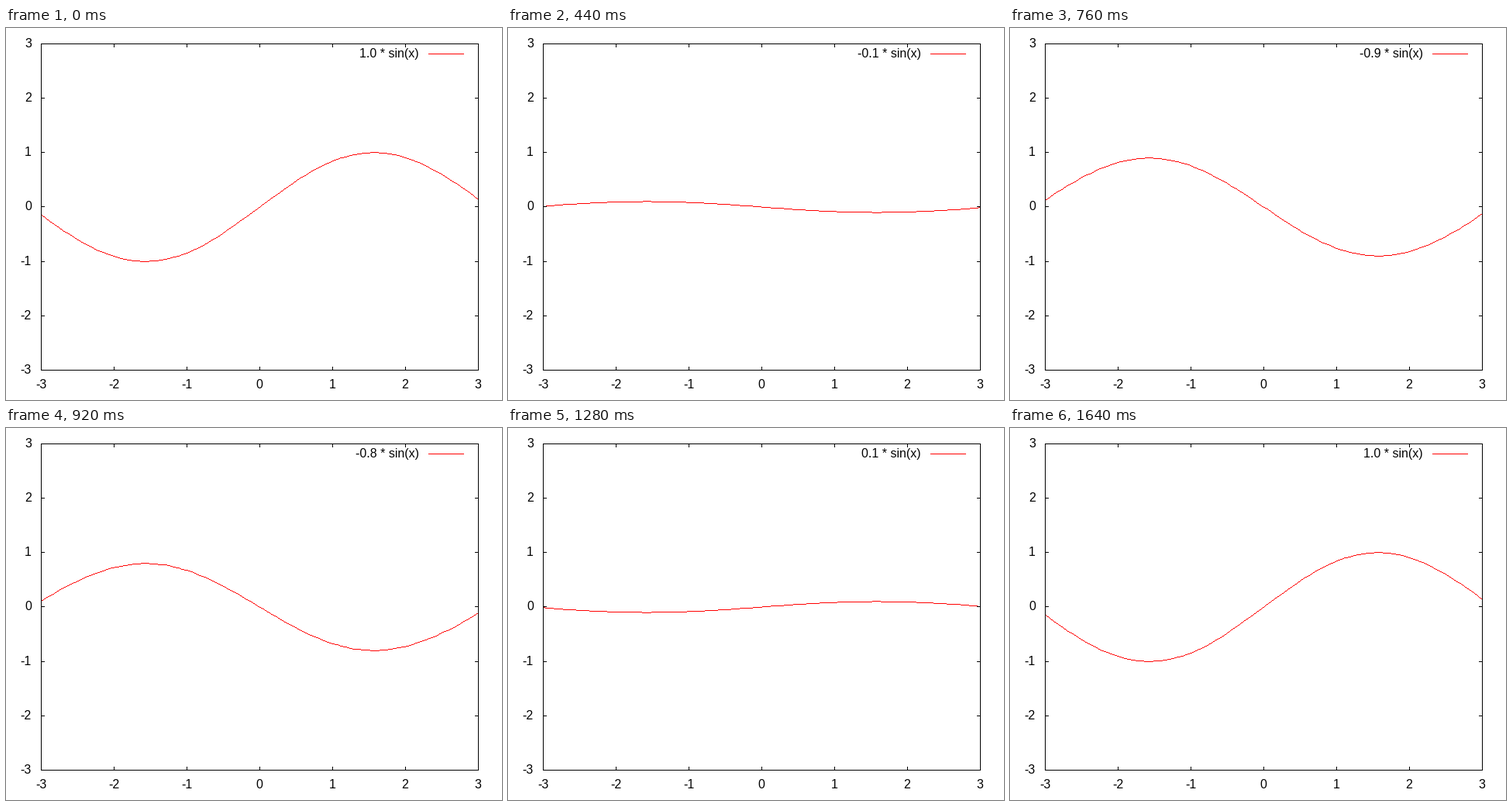
These frames come from a looping animation (640x480 px, 1.68 s). A matplotlib script:

```python
import matplotlib.pyplot as plt
import numpy as np
from matplotlib.animation import FuncAnimation
from matplotlib.patches import Polygon, Rectangle

W, H, DPI = 640, 480, 80
PX = 72 / DPI  # one pixel in points
LEFT, RIGHT, TOP, BOTTOM = 45, 609, 20, 441
TICK = 5
KEY_Y = 33
SWEEP = 21  # frames in each direction

plt.rcParams.update({
    "font.family": "Liberation Sans",
    "font.size": 16 * PX,
    "text.hinting": "default",
})

fig = plt.figure(figsize=(W / DPI, H / DPI), dpi=DPI, facecolor="white")
ax = fig.add_axes([0, 0, 1, 1])
ax.set(xlim=(0, W), ylim=(H, 0))
ax.axis("off")


def to_x(v):
    return np.floor(LEFT + (RIGHT - LEFT) * (v + 3) / 6 + 0.5)


def to_y(v):
    # round upwards on screen, like a plot measured from the bottom edge
    return np.ceil(BOTTOM - (BOTTOM - TOP) * (v + 3) / 6 - 0.5)


def bar(x, y, w, h, color="black"):
    ax.add_patch(Rectangle((x, y), w, h, color=color, lw=0, zorder=3))


def label(x, y, text, align):
    return ax.text(x, y + 5, text, ha=align, va="baseline", color="black")


def amplitude(frame):
    step = frame if frame < SWEEP else 2 * SWEEP - 1 - frame
    return (10 - step) / 10


def curve_outline(amp):
    """Outline of a one-pixel-thick curve, stepped on the pixel grid."""
    v = np.linspace(-3, 3, 100)
    cols = np.arange(LEFT, RIGHT + 1)
    rows = np.interp(cols, to_x(v), to_y(amp * np.sin(v)))
    top = np.repeat(np.floor(rows + 0.5), 2)
    x = np.column_stack([cols, cols + 1]).ravel()
    return np.column_stack([np.r_[x, x[::-1]], np.r_[top, top[::-1] + 1]])


# border
for y in (TOP, BOTTOM):
    bar(LEFT, y, RIGHT - LEFT + 1, 1)
for x in (LEFT, RIGHT):
    bar(x, TOP, 1, BOTTOM - TOP + 1)

# ticks and their labels
for v in range(-3, 4):
    x, y = to_x(v), to_y(v)
    bar(x, TOP, 1, TICK)
    bar(x, BOTTOM + 1 - TICK, 1, TICK)
    bar(LEFT, y, TICK, 1)
    bar(RIGHT + 1 - TICK, y, TICK, 1)
    label(x, 460, str(v), "center")
    label(33, y, str(v), "right")

# key
bar(545, KEY_Y, 46, 1, "red")
title = label(533, KEY_Y, "", "right")

curve = ax.add_patch(Polygon(curve_outline(1), color="red", lw=0, zorder=2))


def draw(frame):
    amp = amplitude(frame)
    curve.set_xy(curve_outline(amp))
    title.set_text(f"{amp:.1f} * sin(x)")
    return curve, title


anim = FuncAnimation(fig, draw, frames=2 * SWEEP, interval=40,
                     repeat=True, repeat_delay=0)
plt.show()
```
